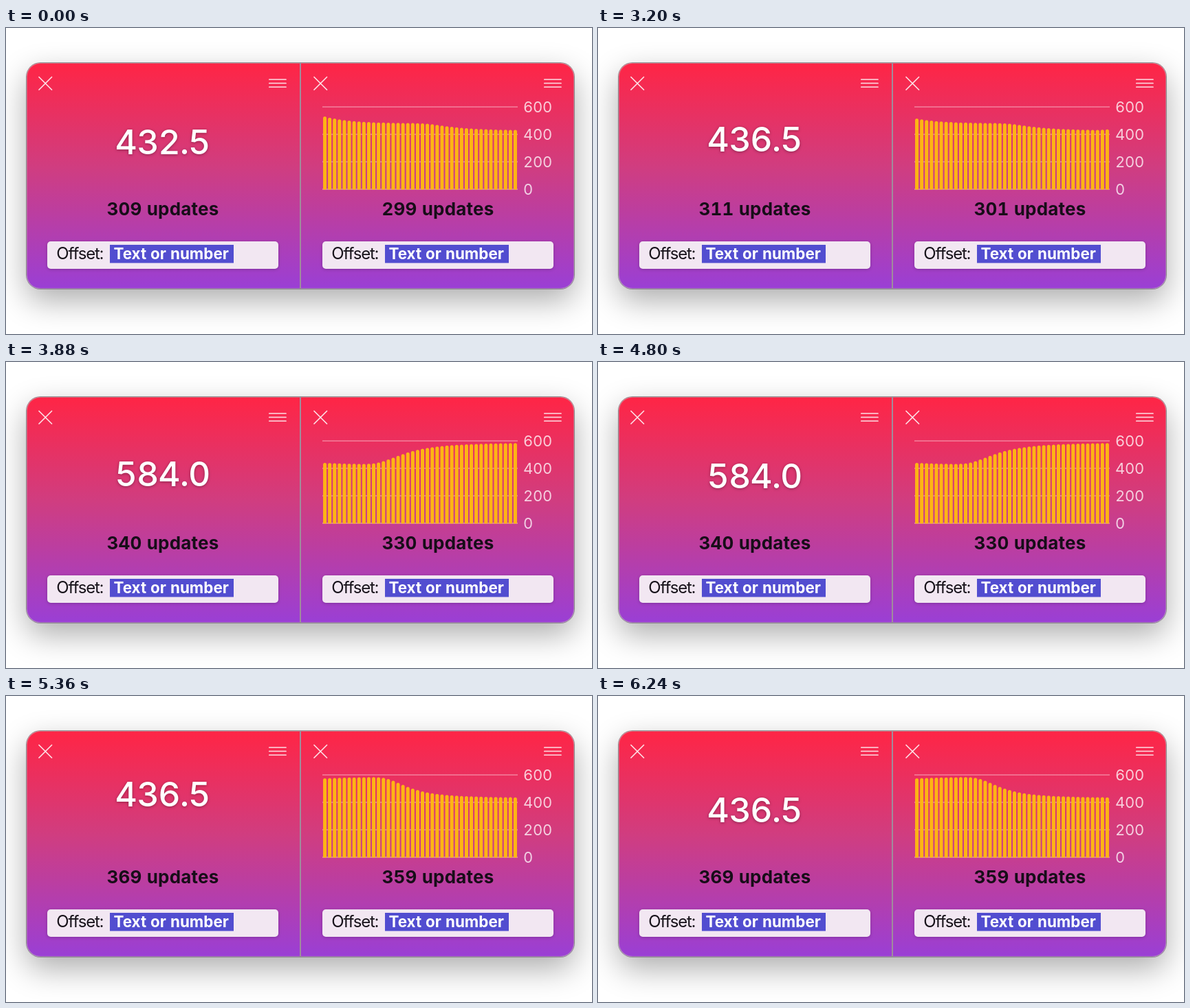
These frames come from a looping animation (852 by 446 pixels, 6.34 s). An HTML page:

```html
<!DOCTYPE html>
<html lang="en">
<head>
<meta charset="utf-8">
<title>Live value</title>
<style>
html, body { margin: 0; width: 100%; height: 100%; overflow: hidden; background: #fff; }
.window {
  position: absolute; left: 30px; top: 51px; width: 796px; height: 329px;
  border-radius: 20px;
  background: linear-gradient(#ff2545, #d03d80 46%, #9a3fd5);
  box-shadow: inset 0 0 0 1px rgba(185, 170, 178, .5), 0 0 0 1px rgba(110, 106, 110, .7),
    0 17px 46px rgba(0, 0, 0, .33);
}
svg { position: absolute; left: 0; top: 0; display: block; }
text { font-family: Inter, "Open Sans", sans-serif; font-variant-numeric: tabular-nums; }
.icon { fill: none; stroke: #fff; stroke-opacity: .85; stroke-width: 1.7; stroke-linecap: round; }
.value {
  font-size: 50px; font-weight: 500; letter-spacing: -1px; fill: #fff; text-anchor: middle;
  text-shadow: 0 1px 4px rgba(0, 0, 0, .35);
}
.count { font-size: 26px; font-weight: 700; letter-spacing: .2px; fill: #170d18; text-anchor: middle; }
.field { fill: #f2e7f2; filter: drop-shadow(0 1px 2px rgba(0, 0, 0, .22)); }
.label { font-size: 24px; letter-spacing: -1.1px; fill: #17121a; }
.hint { font-size: 22.4px; font-weight: 700; fill: #fff; }
.bars { fill: none; stroke: #feb414; stroke-width: 5; stroke-linecap: round; }
.grid { fill: none; stroke: #fff; stroke-opacity: .4; stroke-width: 1.6; }
.axis { font-size: 22px; letter-spacing: -.3px; fill: #fff; fill-opacity: .76; }
</style>
</head>
<body>
<div class="window"></div>
<svg width="852" height="446" viewBox="0 0 852 446">
  <defs>
    <clipPath id="plot"><rect x="455" y="100" width="295" height="135.5"/></clipPath>
    <g id="pane">
      <path class="icon" d="M48 71.500l18.500 18.500M66.500 71.500l-18.500 18.500M382.800 75h24.200M382.800 80.500h24.200M382.800 86h24.200"/>
      <rect class="field" x="60" y="311" width="336" height="40" rx="5"/>
      <text class="label" x="73.300" y="337">Offset:</text>
      <rect x="151" y="316" width="180" height="26.500" fill="#524dd0"/>
      <text class="hint" x="156.500" y="337">Text or number</text>
    </g>
  </defs>
  <rect x="427" y="51" width="2" height="329" fill="#a08c9c"/>
  <use href="#pane"/>
  <use href="#pane" x="400"/>
  <text class="value" id="value" x="227.500" y="184"></text>
  <text class="count" id="left" x="228" y="273"></text>
  <text class="count" id="right" x="628" y="273"></text>
  <path class="grid" d="M460 115h284M460 155h284M460 195h284M460 235h284"/>
  <path class="bars" id="bars" clip-path="url(#plot)"/>
  <g class="axis">
    <text x="752" y="123">600</text>
    <text x="752" y="163">400</text>
    <text x="752" y="203">200</text>
    <text x="752" y="243">0</text>
  </g>
</svg>
<script>
const LOOP = 6340, STEP = 40, BARS = 40, PITCH = 7.1, LIFT = 32;
const el = id => document.getElementById(id);
const value = el('value'), left = el('left'), right = el('right'), bars = el('bars');

// S-curve with a long tail: 0 at k = 0, about one half at k = half, 1 at k = span
function ease(k, span, half) {
  const hill = x => x ** 2.5 / (x ** 2.5 + half ** 2.5);
  return hill(Math.min(Math.max(k, 0), span)) / hill(span);
}

// Value after update n: an old decay, a drop, a rise and a fall
const valueAt = n => 432.5
  + 50 * Math.exp((270 - n) / 5.5)
  + 47.5 * (1 - ease(n - 288, 21, 8))
  + 151.5 * ease(n - 309, 31, 8.6)
  - 147.5 * ease(n - 340, 29, 7.4);

// Underdamped spring going from 1 to 0
function spring(ms) {
  if (ms <= 0) return 1;
  const t = ms / 1000, b = 7, w = 9.7;
  return Math.exp(-b * t) * (Math.cos(w * t) + b / w * Math.sin(w * t));
}

// Lifts while updates arrive, then drops back
const lift = (t, start, end) => LIFT * (spring(t - end) - spring(t - start));

function updatesAt(t) {
  const ticks = start => Math.max(0, Math.round((t - start) * 0.06));
  if (t < 3200) return 309;
  return t < 4800 ? Math.min(340, 309 + ticks(3167)) : Math.min(369, 340 + ticks(4800));
}

function offsetAt(t) {
  if (t < 3200) return 0;
  const y = t < 4800 ? lift(t, 3150, 3683) : lift(t, 4800, 5283);
  return Math.abs(y) < 0.08 ? 0 : -y;
}

function draw(time) {
  const t = Math.floor(time % LOOP / STEP) * STEP;
  const n = updatesAt(t);
  value.textContent = (Math.round(valueAt(n) * 2) / 2).toFixed(1);
  value.setAttribute('transform', `translate(0 ${offsetAt(t).toFixed(2)})`);
  left.textContent = n + ' updates';
  right.textContent = n - 10 + ' updates';
  let d = '';
  for (let i = 0; i < BARS; i++) {
    const top = 235 - valueAt(n - BARS + 1 + i) / 5;
    d += `M${(460 + (i + 0.5) * PITCH).toFixed(2)} 240V${(top + 2.5).toFixed(2)}`;
  }
  bars.setAttribute('d', d);
}

function tick() {
  draw(performance.now());
  requestAnimationFrame(tick);
}
tick();
</script>
</body>
</html>
```
